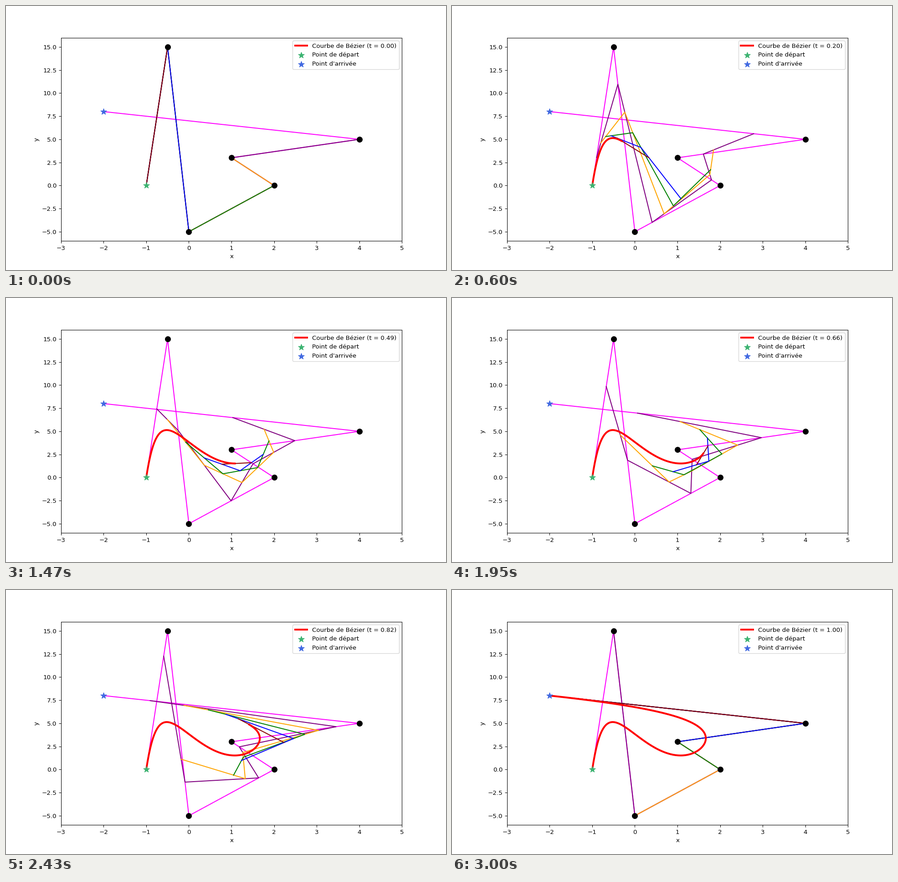
Write a matplotlib script that moves like this. It is 966x580 px and loops after 3820 ms.

```python
import numpy as np
import matplotlib.pyplot as plt
from matplotlib.animation import FuncAnimation

LOOP, TICK, STEP = 3820, 10, 30  # ms
WIDTH, HEIGHT, DPI = 966, 580, 96.6
SAMPLES = 100
COLORS = ["magenta", "purple", "orange", "green", "blue", "darkred"]

points = np.array([(-1, 0), (-0.5, 15), (0, -5), (2, 0), (1, 3), (4, 5), (-2, 8)], float)
times = np.linspace(0, 1, SAMPLES)


def casteljau(t):
    """All levels of the construction, from the control polygon to the curve point."""
    levels = [points]
    while len(levels[-1]) > 1:
        p = levels[-1]
        levels.append((1 - t) * p[:-1] + t * p[1:])
    return levels


steps = [casteljau(t) for t in times]
path = np.array([levels[-1][0] for levels in steps])

plt.rcParams["font.family"] = "DejaVu Sans"
# The tiny margin keeps the pixel size from being truncated
fig, ax = plt.subplots(figsize=((WIDTH + 0.01) / DPI, (HEIGHT + 0.01) / DPI), dpi=DPI)
ax.set(xlim=(-3, 5), ylim=(-6, 16), xlabel="x", ylabel="y")

polygons = [ax.plot([], [], color=c, lw=1.5)[0] for c in COLORS]
curve, = ax.plot([], [], color="red", lw=3, label="Courbe de Bézier (t = 0.00)")
ax.scatter(*points[1:-1].T, s=75, color="black", zorder=3)
ax.scatter(*points[0], s=100, marker="*", color="mediumseagreen", zorder=3,
           label="Point de départ")
ax.scatter(*points[-1], s=100, marker="*", color="royalblue", zorder=3,
           label="Point d'arrivée")
caption = ax.legend(loc="upper right").get_texts()[0]


def update(frame):
    k = min(frame * TICK // STEP, SAMPLES)
    i = min(k, SAMPLES - 1)
    for line, level in zip(polygons, steps[i]):
        line.set_data(*level.T)
    curve.set_data(*path[:k].T)  # the trace runs one sample behind
    caption.set_text(f"Courbe de Bézier (t = {times[i]:.2f})")
    return [*polygons, curve, caption]


anim = FuncAnimation(fig, update, frames=LOOP // TICK, interval=TICK,
                     init_func=lambda: update(0), repeat=True, repeat_delay=0)
plt.show()
```
